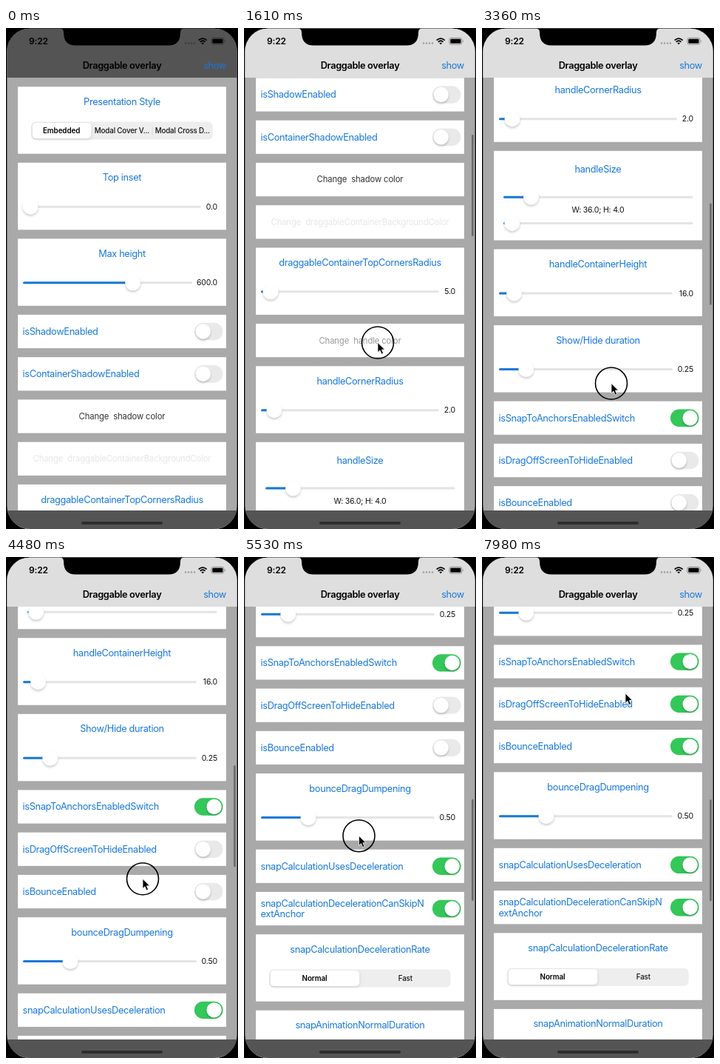
These frames come from a looping animation (314x676 px, 8 s). An HTML page:

```html
<!DOCTYPE html>
<html lang="en">
<head>
<meta charset="utf-8">
<title>Draggable overlay</title>
<style>
  html, body { margin: 0; width: 100%; height: 100%; overflow: hidden; background: #000; }
  svg { display: block; width: 100vw; height: 100vh; font-family: Inter, Roboto, sans-serif; }
  text { white-space: pre; }
  .label { font-size: 12.8px; letter-spacing: -.027em; fill: #1878d8; }
  .value { font-size: 10.56px; letter-spacing: -.018em; fill: #111; }
  .button { font-size: 11.3px; letter-spacing: -.013em; }
  .segment { font-size: 9.8px; letter-spacing: -.018em; font-weight: 500; fill: #111; }
  .picked { font-weight: 600; letter-spacing: -.006em; fill: #000; }
  .bar { font-size: 12.8px; letter-spacing: -.028em; font-weight: 600; fill: #000; }
  .time { font-size: 12px; letter-spacing: -.01em; font-weight: 600; }
  .knob { fill: #fff; filter: drop-shadow(0 2px 1.6px rgba(0, 0, 0, .2)); }
  .pill { filter: drop-shadow(0 1px 1.5px rgba(0, 0, 0, .2)); }
</style>
</head>
<body>
<svg id="stage" viewBox="0 0 314 676" preserveAspectRatio="none">
  <defs>
    <clipPath id="screen"><rect x="1.3" y=".7" width="311.4" height="675.3" rx="31"/></clipPath>
  </defs>
  <rect width="314" height="676" fill="#000"/>
  <g clip-path="url(#screen)">
    <rect width="314" height="676" fill="#a9a9a9"/>
    <g id="list"></g>
    <rect id="scrollbar" x="308.2" width="2.4" height="137" rx="1.2" fill="#666"/>
    <rect width="314" height="67" fill="#545454"/>
    <rect id="light" width="314" height="67" fill="#dedede"/>
    <rect y="651" width="314" height="25" fill="#545454"/>
    <rect x="102" y="666" width="110" height="4" rx="2" fill="#2e2e2e"/>
    <text class="bar" x="157" y="55.4" text-anchor="middle">Draggable overlay</text>
    <text class="label" x="298" y="55.2" text-anchor="end">show</text>
    <text class="time" x="31" y="22.3">9:22</text>
    <path d="M243 20.6H256" stroke="#000" stroke-opacity=".28" stroke-width="2.6" stroke-linecap="round" stroke-dasharray="0 4"/>
    <path d="M260.7 16.6Q266.2 11.6 271.7 16.6M262.8 18.8Q266.2 15.8 269.6 18.8" fill="none" stroke="#000" stroke-width="1.8"/>
    <path d="M264.3 20.4Q266.2 18.9 268.1 20.4L266.2 22.3Z"/>
    <rect x="277.9" y="13.4" width="17" height="8.8" rx="2.5" fill="none" stroke="#000" stroke-opacity=".45" stroke-width=".8"/>
    <rect x="279.3" y="14.8" width="14.2" height="6" rx="1.3"/>
    <path d="M296 16.2Q297.5 17.8 296 19.4Z" opacity=".5"/>
    <path d="M73 0V.8Q78 .8 78 6Q78 23.5 94 23.5H220Q236 23.5 236 6Q236 .8 241 .8V0Z"/>
  </g>
  <g id="pointer">
    <circle id="ring" r="21.5" fill="none" stroke="#000" stroke-width="1.6"/>
    <path d="M0 0V13.2L3 10.4L5.2 15.4L7.6 14.4L5.4 9.5H9.6Z" stroke="#fff" stroke-width=".8"/>
  </g>
</svg>
<script>
(() => {
  const LOOP = 8000, STEP = 70;
  const LEFT = 23, MIDDLE = 157, GAP = 12.06;
  const SMALL = 45.2, LARGE = 90.5;
  const BLUE = "#1878d8";
  const $ = id => document.getElementById(id);

  const clamp = v => Math.max(0, Math.min(1, v));
  const ease = v => { const u = clamp(v); return u * u * (3 - 2 * u); };
  const mix = (a, b, u) => a + (b - a) * u;

  function set(el, attrs) {
    for (const key in attrs) el.setAttribute(key, attrs[key]);
    return el;
  }
  function add(parent, tag, attrs) {
    const el = document.createElementNS("http://www.w3.org/2000/svg", tag);
    return parent.appendChild(set(el, attrs));
  }
  const box = (g, x, y, width, height, rx, fill) =>
    add(g, "rect", { x, y, width, height, rx, fill });
  const write = (g, cls, x, y, text, anchor = "middle") => {
    const el = add(g, "text", { class: cls, x, y, "text-anchor": anchor });
    el.textContent = text;
    return el;
  };

  function track(g, x1, x2, knob, y) {
    box(g, x1, y - 1.5, x2 - x1, 3, 1.5, "#e4e4e5");
    box(g, x1, y - 1.5, knob - x1, 3, 1.5, BLUE);
    add(g, "circle", { class: "knob", cx: knob, cy: y, r: 10.5 });
  }

  // The track ends where the value's text begins
  const slider = (title, value, knob) => ({ height: LARGE, draw(g) {
    write(g, "label", MIDDLE, 24.6, title);
    track(g, LEFT, 282.5 - 6.2 * (value.length - 1) + (value.length - 3) * .3 - 6.2, knob, 59.4);
    write(g, "value", 286, 63, value, "end");
  }});

  const segments = (title, ...names) => ({ height: LARGE, draw(g) {
    write(g, "label", MIDDLE, 24.6, title);
    const w = 245.5 / names.length;
    box(g, 34.2, 47.3, 245.5, 24.1, 6, "#eeeeef");
    set(box(g, 35.6, 48.7, w - 2, 21.3, 5, "#fff"), { class: "pill" });
    names.forEach((name, i) => {
      write(g, i ? "segment" : "segment picked", 34.2 + w * (i + .5), 62.9, name);
      if (i > 1) box(g, 34 + w * i, 53, .8, 12.6, 0, "#d4d4d6");
    });
  }});

  const button = (text, fill) => ({ height: SMALL, draw(g) {
    set(write(g, "button", MIDDLE, 26.6, text), { fill });
  }});

  const ON = -Infinity, OFF = Infinity;
  const switches = [];
  const toggle = (text, start) => ({ height: SMALL, draw(g) {
    const lines = text.split("\n");
    lines.forEach((line, i) =>
      write(g, "label", 22.5, 27.1 + (i - (lines.length - 1) / 2) * 14.9, line, "start"));
    box(g, 255, 10.9, 38.5, 23.4, 11.7, "#e9e9ea");
    const green = box(g, 255, 10.9, 38.5, 23.4, 11.7, "#34c759");
    const knob = add(g, "circle", { class: "knob", cy: 22.6, r: 10.2 });
    switches.push({ green, knob, start });
  }});

  const sizeCard = { height: 120.6, draw(g) {
    write(g, "label", MIDDLE, 29.6, "handleSize");
    track(g, 29, 285.5, 66.5, 62.3);
    write(g, "value", MIDDLE, 83, "W: 36.0; H: 4.0");
    track(g, 29, 285.5, 40.8, 97.6);
  }};

  // Two taps, each flipping a switch when released
  const taps = [
    { start: 6440, end: 6580, x: 272, y: 199 },
    { start: 7350, end: 7490, x: 272, y: 258 }
  ];

  const cards = [
    segments("Presentation Style", "Embedded", "Modal Cover V...", "Modal Cross D..."),
    slider("Top inset", "0.0", 33),
    slider("Max height", "600.0", 171.7),
    toggle("isShadowEnabled", OFF),
    toggle("isContainerShadowEnabled", OFF),
    button("Change  shadow color", "#333"),
    button("Change  draggableContainerBackgroundColor", "#e6e6e6"),
    slider("draggableContainerTopCornersRadius", "5.0", 36),
    button("Change  handle color", "#999"),
    slider("handleCornerRadius", "2.0", 41),
    sizeCard,
    slider("handleContainerHeight", "16.0", 43.5),
    slider("Show/Hide duration", "0.25", 59.8),
    toggle("isSnapToAnchorsEnabledSwitch", ON),
    toggle("isDragOffScreenToHideEnabled", taps[0].end),
    toggle("isBounceEnabled", taps[1].end),
    slider("bounceDragDumpening", "0.50", 87),
    toggle("snapCalculationUsesDeceleration", ON),
    toggle("snapCalculationDecelerationCanSkipN\nextAnchor", ON),
    segments("snapCalculationDecelerationRate", "Normal", "Fast"),
    slider("snapAnimationNormalDuration", "0.20", 60)
  ];

  let cardY = 79.2;
  for (const card of cards) {
    const g = add($("list"), "g", { transform: `translate(0 ${cardY})` });
    box(g, 16.1, 0, 281.9, card.height, 0, "#fff");
    card.draw(g);
    cardY += card.height + GAP;
  }

  // Each drag pulls the list along with the pointer
  const drags = [
    { start: 350, end: 1000, x: 180, y: 560, pull: 200 },
    { start: 1400, end: 1820, x: 181, y: 544, pull: 239 },
    { start: 2130, end: 2550, x: 187, y: 546, pull: 208 },
    { start: 3010, end: 3850, x: 175, y: 545, pull: 174 },
    { start: 4270, end: 4760, x: 185, y: 515, pull: 205 },
    { start: 5150, end: 5570, x: 155.5, y: 446, pull: 71.6 }
  ];
  const presses = [...drags, ...taps];
  const hold = ({ start, end, x, y, pull = 0 }) =>
    [{ t: start, x, y }, { t: end, x, y: y - pull }];

  const stops = [
    { t: 280, x: 240, y: 690 },
    ...drags.flatMap(hold),
    { t: 5810, x: 155.5, y: 375 },
    { t: 6150, x: 300, y: 250 },
    ...hold(taps[0]),
    { t: 7000, x: 137, y: 298 },
    ...hold(taps[1]),
    { t: 7980, x: 194, y: 184 }
  ];

  const progress = (t, a, b) => ease((t - a) / (b - a));

  function pointerAt(t) {
    const i = Math.max(1, stops.findIndex(s => s.t > t));
    const next = t >= stops.at(-1).t ? stops.length - 1 : i;
    const a = stops[next - 1], b = stops[next], u = progress(t, a.t, b.t);
    return { x: mix(a.x, b.x, u), y: mix(a.y, b.y, u) };
  }

  function render(t) {
    const scroll = drags.reduce((sum, d) => sum + d.pull * progress(t, d.start, d.end), 0);
    const { x, y } = pointerAt(t);
    const scrolled = clamp(scroll / 20);
    const pressed = presses.some(p => t >= p.start && t < p.end);
    set($("list"), { transform: `translate(0 ${-scroll})` });
    set($("light"), { opacity: scrolled });
    set($("scrollbar"), { y: 68.8 + .2355 * scroll, opacity: scrolled });
    set($("pointer"), { transform: `translate(${x} ${y})`, opacity: t < stops[0].t ? 0 : 1 });
    set($("ring"), { opacity: pressed ? 1 : 0 });
    for (const { green, knob, start } of switches) {
      const k = ease((t - start) / 210);
      set(green, { opacity: k });
      set(knob, { cx: mix(266.7, 281.7, k) });
    }
  }

  const begin = performance.now();
  function tick() {
    const t = (performance.now() - begin) % LOOP;
    render(Math.floor(t / STEP) * STEP);
    requestAnimationFrame(tick);
  }
  tick();
})();
</script>
</body>
</html>
```
